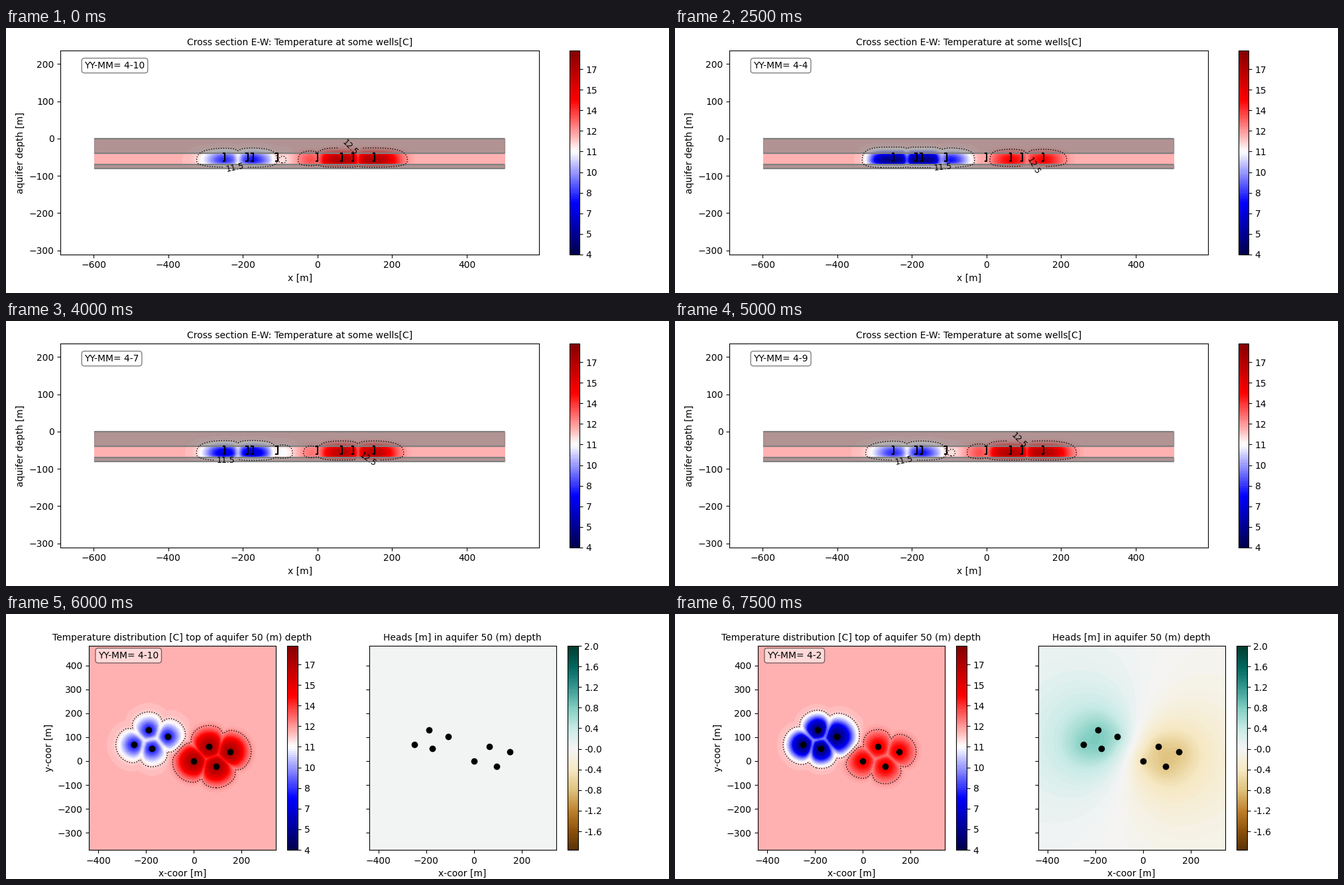
A matplotlib script that plays this animation: 1000 by 400 pixels, repeating every 8000 ms.

```python
import math

import matplotlib.pyplot as plt
import numpy as np
from matplotlib.animation import FuncAnimation
from matplotlib.patches import Rectangle

W, H = 1000, 400
MONTHS = [10, 11, 12, 2, 3, 4, 5, 6, 7, 8, 9, 10]
SECTION_FRAMES, PLAN_FRAMES = 12, 4

T_LEVELS = 4 + 0.14 * np.arange(100)
T_TICKS = 4 + 1.4 * np.arange(10)
H_LEVELS = -1.96 + 0.04 * np.arange(100)
H_TICKS = -1.6 + 0.4 * np.arange(10) - 1e-9
T_GROUND = 12.0

COLD = [(-250, 68), (-188, 130), (-108, 103), (-174, 52)]
HOT = [(0, 0), (65, 60), (152, 40), (95, -23)]
# sideways distance of each well from the section line
COLD_OFF = [15, 80, 66, 3]
HOT_OFF = [64, 5, 5, 75]

# season step -> strength, radius and front width of the stored water
STEPS = [0, 2, 3, 5, 7, 10]
COLD_KEYS = ([4.9, 6.9, 7.0, 7.0, 6.4, 4.9],
             [40, 44, 52, 60, 46, 40],
             [40, 28, 30, 24, 30, 40])
HOT_KEYS = ([4.9, 4.4, 3.1, 2.8, 4.9, 4.9],
            [55, 48, 45, 40, 40, 55],
            [38, 38, 39, 36, 38, 38])
SPREAD = [0, 0.12, 0.18, 0.25, 0.12, 0]
PUMPING = [0, 0.6, 0.85, 1]

erf = np.vectorize(math.erf, otypes=[float])

fig = plt.figure(figsize=(W / 100, H / 100), dpi=100)


def bubbles(dists, keys, step):
    """Front around the nearest well, pinched midway between two wells."""
    amp, radius, width = (np.interp(step, STEPS, k) for k in keys)
    near, second = np.sort(dists, axis=0)[:2]
    front = 0.5 - 0.5 * erf((near - radius) / width)
    return amp * front * (1 - 0.4 * np.exp(-((second - near) / 15) ** 2))


def temperature_change(cold_dists, hot_dists, step):
    grow = 1 + np.interp(step, STEPS, SPREAD)
    cold_dists = list(cold_dists)
    cold_dists[2] = cold_dists[2] / grow
    return (bubbles(hot_dists, HOT_KEYS, step)
            - bubbles(cold_dists, COLD_KEYS, step))


def draw_temperature(ax, x, y, temp):
    fill = ax.contourf(x, y, temp, T_LEVELS, cmap="seismic", vmin=4, vmax=18)
    lines = ax.contour(x, y, temp, [11.5, 12.5], colors="k",
                       linestyles="dotted", linewidths=1)
    fig.colorbar(fill, ax=ax, ticks=T_TICKS, format="%.0f")
    return lines


def draw_stamp(ax, y, month):
    ax.text(0.05, y, f"YY-MM= 4-{month}", transform=ax.transAxes,
            va="top", fontsize=10, zorder=5,
            bbox=dict(boxstyle="round", facecolor="white", alpha=0.5))


def label_spots(step):
    """Pixel place and angle of the two contour labels."""
    if step in (2, 3):
        return (343, 211, 12), (525, 184, -64)
    if step in (4, 5, 6):
        return (404, 210, 6), (541, 208, -60)
    if step in (7, 8, 9):
        return (332, 211, 0), (546, 209, -35)
    return (346, 211, 12), (519, 180, -45)


def draw_section(step):
    ax = fig.add_subplot()
    x = np.linspace(-598, 502, 441)
    y = np.linspace(-80, 0, 81)
    cold = [np.hypot(x - w[0], d) for w, d in zip(COLD, COLD_OFF)]
    hot = [np.hypot(x - w[0], d) for w, d in zip(HOT, HOT_OFF)]
    depth = 0.5 * (erf((-37 - y) / 13.5) + erf((y + 71) / 7))
    temp = T_GROUND + np.outer(depth, temperature_change(cold, hot, step))
    lines = draw_temperature(ax, x, y, temp)

    for base, height in ((-40, 40), (-80, 10)):
        ax.add_patch(Rectangle((-598, base), 1100, height, color="gray",
                               alpha=0.6, lw=1, zorder=1.5))
    ax.hlines([0, -40, -70, -80], -598, 502, color="gray", lw=1.5, zorder=1.6)
    for wx, _ in COLD + HOT:
        ax.plot([wx - 3, wx + 1, wx + 1, wx - 3], [-40, -40, -61.5, -61.5],
                color="k", lw=1.5, zorder=3)

    ax.set(xlim=(-689, 594.6), ylim=(-311, 235.4),
           xlabel="x [m]", ylabel="aquifer depth [m]")
    ax.set_title("Cross section E-W: Temperature at some wells[C]", fontsize=10)
    draw_stamp(ax, 0.95, MONTHS[step])
    fig.tight_layout()

    spots = label_spots(step)
    to_data = ax.transData.inverted()
    places = [tuple(to_data.transform((px, H - py))) for px, py, _ in spots]
    labels = ax.clabel(lines, fmt="%.1f", fontsize=9, manual=places)
    for text, place, spot in zip(labels, places, spots):
        text.set_position(place)
        text.set_rotation(spot[2])


def plan_axes(column, title):
    ax = fig.add_subplot(1, 2, column)
    ax.set_title(title, fontsize=10)
    ax.plot(*zip(*COLD, *HOT), "ko", zorder=4)
    ax.set(xlim=(-439, 344), ylim=(-372, 483), xlabel="x-coor [m]",
           xticks=range(-400, 201, 200), yticks=range(-300, 401, 100))
    return ax


def draw_plan(step):
    x = np.linspace(-439, 344, 158)
    y = np.linspace(-372, 483, 172)
    gx, gy = np.meshgrid(x, y)
    cold = [np.hypot(gx - a, gy - b) for a, b in COLD]
    hot = [np.hypot(gx - a, gy - b) for a, b in HOT]

    def cone(r):
        return 0.5 * np.log(1 + 420 ** 2 / (r ** 2 + 30 ** 2))

    head = 0.155 * PUMPING[step] * (sum(map(cone, cold)) - sum(map(cone, hot)))

    # both panels first, so that the colour bars keep the default grid
    left = plan_axes(1, "Temperature distribution [C] top of aquifer 50 (m) depth")
    right = plan_axes(2, "Heads [m] in aquifer 50 (m) depth")

    left.set_ylabel("y-coor [m]")
    draw_temperature(left, x, y, T_GROUND + temperature_change(cold, hot, step))
    draw_stamp(left, 0.975, MONTHS[step])

    right.set_yticklabels([])
    fill = right.contourf(x, y, head + 1e-6, H_LEVELS, cmap="BrBG",
                          vmin=-2, vmax=2)
    fig.colorbar(fill, ax=right, ticks=H_TICKS, format="%.1f")


def update(i):
    fig.clf()
    fig.subplots_adjust(left=0.125, right=0.9, bottom=0.11, top=0.88,
                        wspace=0.2, hspace=0.2)
    if i < SECTION_FRAMES:
        draw_section(i)
    else:
        draw_plan(i - SECTION_FRAMES)
    return []


anim = FuncAnimation(fig, update, frames=SECTION_FRAMES + PLAN_FRAMES,
                     interval=500, init_func=lambda: [], repeat=True,
                     repeat_delay=0)
plt.show()
```
